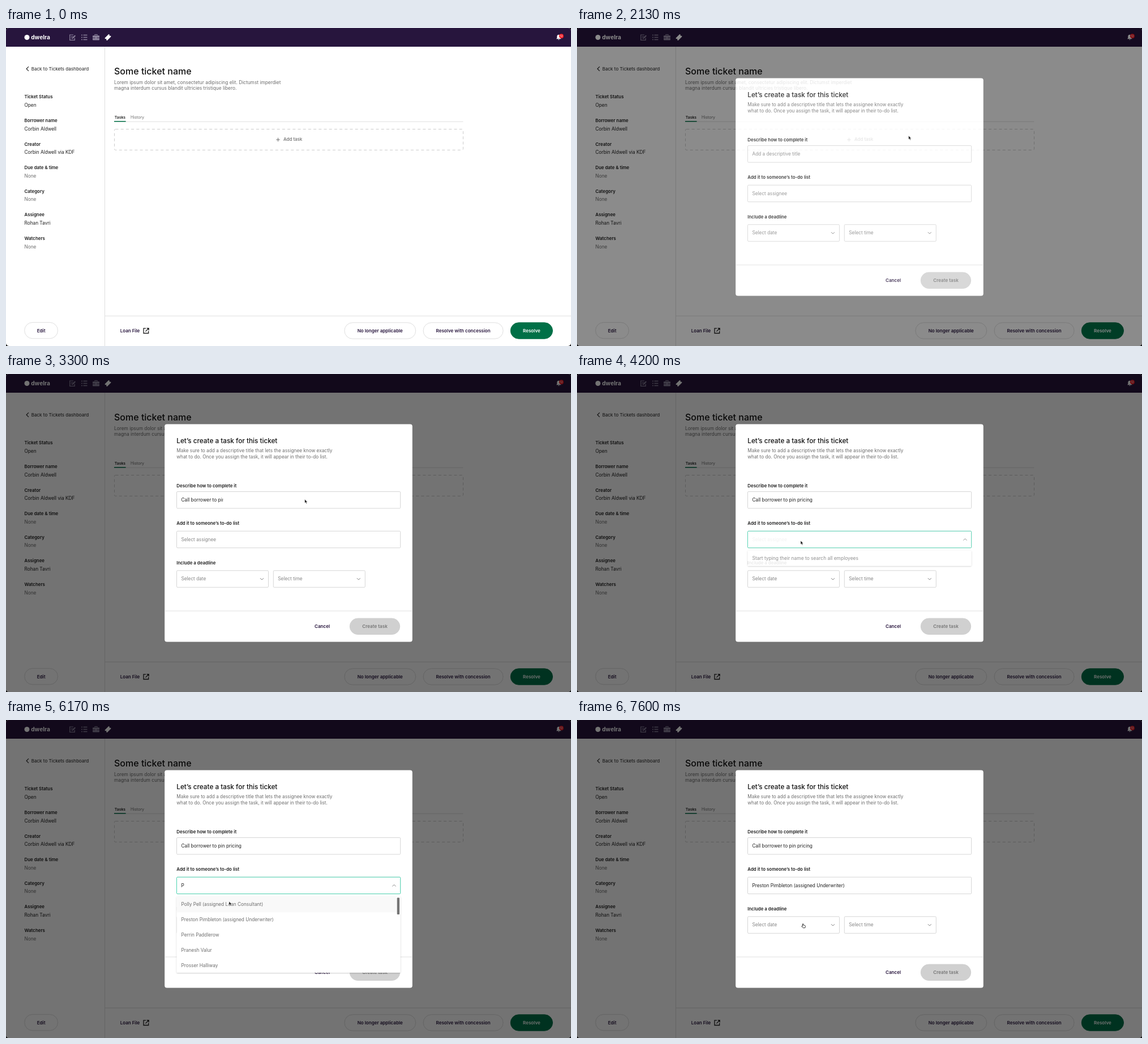
Recreate the animation shown at these times as an HTML page. Size 998 px wide and 561 px high, loop 8000 ms.

```html
<!DOCTYPE html>
<html lang="en">
<head>
<meta charset="utf-8">
<style>
  html, body { margin: 0; width: 100%; height: 100%; overflow: hidden; background: #000; }
  svg { display: block; width: 998px; height: 561px; font-family: Inter, Roboto, sans-serif; }
</style>
</head>
<body>
<svg id="stage" viewBox="0 0 998 561"></svg>
<script>
const INK = '#1e1e1e', GRAY = '#6d6d6d', HINT = '#858585', LINE = '#dfdfdf';
const PURPLE = '#27153d', GREEN = '#007047', MINT = '#4bd3b0';

const text = (x, y, str, { size = 8.25, weight = 400, fill = INK, anchor = 'start' } = {}) =>
  `<text x="${x}" y="${y}" font-size="${size}" font-weight="${weight}" fill="${fill}" text-anchor="${anchor}">${str}</text>`;
const label = (x, y, str) => text(x, y, str, { size: 7.88, weight: 600 });
const rect = (x, y, w, h, fill, extra = '') =>
  `<rect x="${x}" y="${y}" width="${w}" height="${h}" fill="${fill}" ${extra}/>`;
const stroke = (d, color, width = 1, extra = '') =>
  `<path d="${d}" fill="none" stroke="${color}" stroke-width="${width}" ${extra}/>`;
const shape = (d, fill) => `<path d="${d}" fill="${fill}"/>`;
const group = (id, body) => `<g id="${id}">${body}</g>`;

const pill = (x, y, w, str, fill = '#fff', color = PURPLE, border = LINE) =>
  rect(x + 0.5, y + 0.5, w - 1, 28.4, fill, `rx="14.2" stroke="${border}"`) +
  text(x + w / 2, y + 17.6, str, { size: 8.05, weight: 600, fill: color, anchor: 'middle' });
const field = (x, y, w, color = '#d6d6d6') =>
  rect(x, y, w, 29.5, '#fff', `rx="1.5" stroke="${color}"`);
const chevron = (x, y, dir) =>
  stroke(`M${x - 3} ${y - 1.5 * dir}l3 ${3 * dir}l3 ${-3 * dir}`, '#777', 0.9);
const dropdown = (x, str) =>
  field(x, 346.8, 162) + text(x + 8, 364.4, str, { fill: HINT }) + chevron(x + 150.5, 361.6, 1);

function navBar() {
  const muted = '#8b819b';
  return rect(0, 0, 998, 33, PURPLE) +
    '<circle cx="37" cy="16.5" r="4.5" fill="#fff"/>' +
    text(44.2, 20, 'dwelra', { size: 10.2, weight: 700, fill: '#fff' }) +
    stroke('M119 12h-6.3v9.4h8.6v-4M114.5 15h4M114.5 17.5h2', muted, 1.2) +
    stroke('M117 18.6l5.3-5.4', muted, 2) +
    stroke('M133 12.6h2m1.5 0h7M133 16.5h2m1.5 0h7M133 20.4h2m1.5 0h7', muted, 1.5) +
    rect(153, 13.2, 12, 8.4, muted, 'rx="1"') +
    stroke('M157 13v-1.5h4v1.5', muted, 1.1) +
    stroke('M153 17.4h4.6m2.8 0h4.6', PURPLE, 0.8) +
    '<g transform="translate(180 16.4) rotate(-45)">' + rect(-5.2, -3, 10.4, 6, '#fff', 'rx=".8"') +
    '<circle cx="-5.2" r="1.1" fill="' + PURPLE + '"/><circle cx="5.2" r="1.1" fill="' + PURPLE + '"/></g>' +
    shape('M972 19.3l1.3-1.6v-2.6c0-4.3 6-4.3 6 0v2.6l1.3 1.6zM975 20h2.7q-1.3 2-2.7 0z', '#fff') +
    '<circle cx="981" cy="14.3" r="4" fill="#ee1c25"/>' +
    text(981, 16.1, '12', { size: 5, fill: '#fff', anchor: 'middle' });
}

function sidebar() {
  const rows = [
    ['Ticket Status', 'Open'], ['Borrower name', 'Corbin Aldwell'],
    ['Creator', 'Corbin Aldwell via KDF'], ['Due date &amp; time', 'None'],
    ['Category', 'None'], ['Assignee', 'Rohan Tavri'], ['Watchers', 'None']
  ];
  return stroke('M40 68.2l-3.9 3.8l3.9 3.8', INK, 1.1) +
    text(44.7, 74.6, 'Back to Tickets dashboard', { size: 8.08 }) +
    rows.map(([name, value], i) => {
      const y = 124.4 + 41.6 * i;
      return label(32.5, y, name) +
        text(32.5, y + 14.6, value, { fill: value === 'None' ? GRAY : INK });
    }).join('') +
    pill(32.2, 518.9, 59.8, 'Edit') + stroke('M174.5 33V561', LINE);
}

function ticket() {
  return text(191, 82, 'Some ticket name', { size: 16, weight: 500, fill: '#111' }) +
    text(191, 99, 'Lorem ipsum dolor sit amet, consectetur adipiscing elit. Dictumst imperdiet', { size: 8.35, fill: GRAY }) +
    text(191, 109.4, 'magna interdum cursus blandit ultricies tristique libero.', { size: 8.35, fill: GRAY }) +
    text(191.8, 159.8, 'Tasks', { size: 6.8, weight: 600 }) +
    text(220, 159.8, 'History', { size: 7.05, fill: GRAY }) +
    stroke('M191 165.2H807.5', LINE) + stroke('M191 164.8h20.6', GREEN, 1.5) +
    rect(191.5, 178.5, 616, 36.8, 'none', 'rx="2" stroke="#cbcbcb" stroke-dasharray="5 4.2"') +
    stroke('M477.2 197h6.6M480.5 193.7v6.6', GRAY) +
    text(490, 199.4, 'Add task', { size: 7.9, weight: 500, fill: GRAY }) +
    stroke('M174 508H998', LINE) +
    text(201.7, 536.8, 'Loan File', { size: 8, weight: 600, fill: PURPLE }) +
    stroke('M247 529.8h-4v8.7h8.7v-4M248.5 529.6h3.6v3.6M252 529.8l-5.6 5.6', INK, 1.3) +
    pill(597.4, 519.3, 126.8, 'No longer applicable') +
    pill(736.6, 519.3, 142, 'Resolve with concession') +
    pill(890.8, 519.3, 75.2, 'Resolve', GREEN, '#fff', GREEN);
}

function modal() {
  return rect(0, 0, 998, 561, '#000', 'rx="5" opacity=".55"') +
    rect(280.2, 88.5, 437.6, 384, '#fff', 'rx="4"') +
    text(301.3, 121.8, 'Let’s create a task for this ticket', { size: 11.75, weight: 500, fill: '#111' }) +
    text(301.3, 138.1, 'Make sure to add a descriptive title that lets the assignee know exactly', { fill: GRAY }) +
    text(301.3, 148.5, 'what to do. Once you assign the task, it will appear in their to-do list.', { fill: GRAY }) +
    label(301.3, 200.2, 'Describe how to complete it') + field(301.5, 207.5, 395.2) +
    group('titleHint', text(309.5, 224.9, 'Add a descriptive title', { fill: HINT })) +
    '<clipPath id="reveal"><rect id="wipe" x="309" y="210" width="0" height="24"/></clipPath>' +
    `<g clip-path="url(#reveal)">${text(309.5, 224.9, 'Call borrower to pin pricing', { size: 8.3 })}</g>` +
    label(301.3, 265.9, 'Add it to someone’s to-do list') + field(301.5, 277.2, 395.2) +
    group('assigneeHint', text(309.5, 294.6, 'Select assignee', { fill: HINT })) +
    group('chosen', text(309.5, 294.6, 'Preston Pimbleton (assigned Underwriter)')) +
    label(301.3, 335.5, 'Include a deadline') +
    dropdown(301.5, 'Select date') + dropdown(472.3, 'Select time') +
    stroke('M280.2 418H717.8', LINE) +
    text(558.5, 448, 'Cancel', { size: 8.05, weight: 600, fill: PURPLE, anchor: 'middle' }) +
    pill(606.8, 430.6, 89.4, 'Create task', '#d0d0d0', '#777', '#d0d0d0') +
    group('active', field(301.5, 277.2, 395.2, MINT) + chevron(685.5, 292, -1)) +
    group('prompt', panel(27.3) +
      text(309.5, 328.3, 'Start typing their name to search all employees', { size: 8.45, fill: HINT })) +
    group('list', people());
}

const panel = height => rect(301.5, 311.2, 395.2, height, '#fff', 'rx="1.5" filter="url(#shadow)"');

function people() {
  const names = ['Polly Pell (assigned Loan Consultant)', 'Preston Pimbleton (assigned Underwriter)',
    'Perrin Paddlerow', 'Pranesh Valur', 'Prosser Halliway'];
  return text(309.5, 294.6, 'P') + panel(134.6) +
    rect(301.5, 311.3, 388, 28, '#f9f9f9', 'id="hoverFirst"') +
    rect(301.5, 339, 388, 27, '#f9f9f9', 'id="hoverSecond"') +
    names.map((name, i) => text(309.5, 328.4 + 27 * i, name, { fill: GRAY })).join('') +
    rect(690.7, 313.5, 4.4, 29.5, '#757575', 'rx="1"');
}

document.getElementById('stage').innerHTML =
  '<filter id="shadow" x="-5%" y="-30%" width="110%" height="160%">' +
  '<feDropShadow dx="0" dy=".8" stdDeviation="1.3" flood-opacity=".25"/></filter>' +
  rect(0, 0, 998, 561, '#fff', 'rx="5"') +
  '<clipPath id="corners"><rect width="998" height="561" rx="5"/></clipPath>' +
  `<g clip-path="url(#corners)">${navBar()}${sidebar()}${ticket()}</g>` +
  group('modal', modal()) +
  group('cursor',
    group('arrow', '<path d="M0 0v6.6l1.5-1.3 1.1 2.5 1.2-.5-1.1-2.4h2z" fill="#111" stroke="#fff" stroke-width=".5"/>') +
    group('hand', '<path d="M-1 3.6V.3q.7-.9 1.3 0v2l3 .7q.7.3.6 1.2L3.4 7.2H-.4L-2.8 4.3q.3-.9 1.8-.1z" fill="#fff" stroke="#111" stroke-width=".8"/>'));

const el = id => document.getElementById(id);
const opacity = (id, value) => el(id).setAttribute('opacity', value);
const clamp = x => Math.min(1, Math.max(0, x));
const smooth = x => x * x * (3 - 2 * x);
// Abrupt dissolve with a soft tail.
const dissolve = (t, start, length = 780) =>
  t < start ? 0 : 1 - 0.18 * (1 - clamp((t - start) / length)) ** 3;

// [start, end, x, y]: the pointer travels to x, y between the two times.
const moves = [
  [1230, 1530, 587, 176], [1730, 1900, 585.7, 190], [2250, 2880, 527.7, 221],
  [3320, 3600, 395, 294], [5480, 6160, 394, 320], [6270, 6850, 396, 348], [7470, 7600, 399.5, 359.5]
];
function pointer(t) {
  let x = 620, y = 300;
  for (const [start, end, toX, toY] of moves) {
    const k = smooth(clamp((t - start) / (end - start)));
    x += (toX - x) * k;
    y += (toY - y) * k;
  }
  return [x, y];
}

function draw(t) {
  const open = 1 - dissolve(t, 7110, 220);
  const second = dissolve(t, 6290);
  opacity('modal', dissolve(t, 2120));
  opacity('titleHint', t < 3070 ? 1 : 0);
  el('wipe').setAttribute('width', 109 * (1 - (1 - clamp((t - 3070) / 530)) ** 2));
  opacity('assigneeHint', t < 4850 ? 1 : 0);
  opacity('active', dissolve(t, 4050) * open);
  opacity('prompt', dissolve(t, 4050) * (1 - dissolve(t, 5450)));
  opacity('list', dissolve(t, 5450) * open);
  opacity('hoverFirst', 1 - second);
  opacity('hoverSecond', second);
  opacity('chosen', dissolve(t, 7110, 220));
  opacity('cursor', t < 1240 ? 0 : 1);
  opacity('arrow', t < 7530 ? 1 : 0);
  opacity('hand', t < 7530 ? 0 : 1);
  el('cursor').setAttribute('transform', `translate(${pointer(t)})`);
}

function tick() {
  draw(performance.now() % 8000);
  requestAnimationFrame(tick);
}
tick();
</script>
</body>
</html>
```
